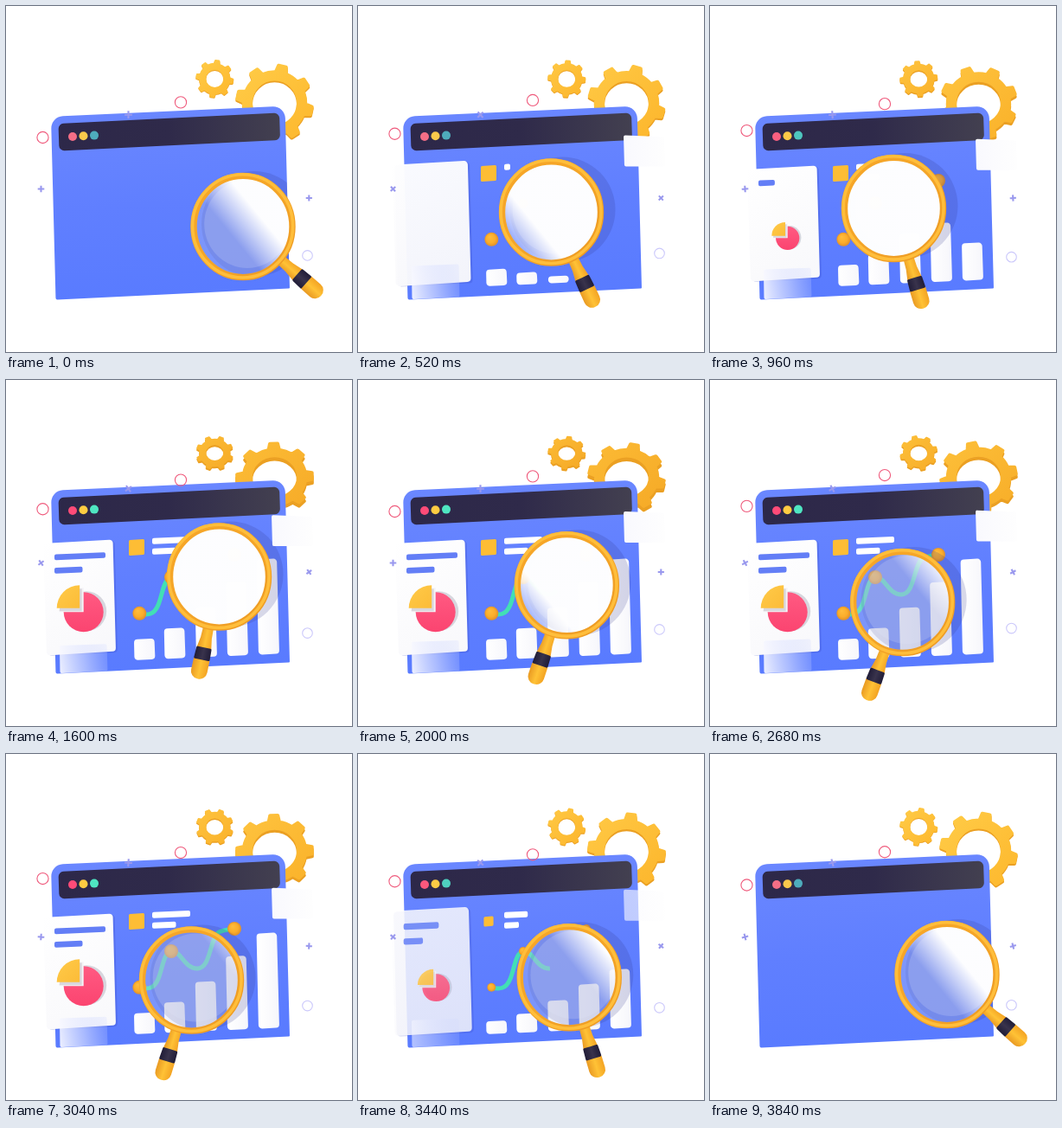
Write an HTML page with a canvas that moves like this. It is 400 by 400 pixels and loops after 4 s.

```html
<!DOCTYPE html>
<html lang="en">
<head>
<meta charset="utf-8">
<title>Dashboard search</title>
<style>
html, body { margin: 0; width: 100%; height: 100%; overflow: hidden; background: #fff; }
canvas { display: block; width: 400px; height: 400px; }
</style>
</head>
<body>
<canvas id="stage" width="400" height="400"></canvas>
<script>
const ctx = document.getElementById('stage').getContext('2d');
const TAU = Math.PI * 2;
const RAD = Math.PI / 180;
const LOOP = 4000, STEP = 40, LAST = 3840;
const LEAVE = 3230;

// time, lens x, lens y, handle angle, edge of the glare
const POSES = [
  [0, 274, 255, 41.5, 3],
  [520, 223.5, 238.5, 65, -44],
  [960, 212.5, 234, 73.5, -95],
  [1600, 246.5, 227.5, 102, -95],
  [2360, 233, 249.5, 111, 10],
  [3040, 214.5, 261.5, 107, 62],
  [LAST, 274, 255, 41.5, 3]
];
const PANEL = [[52, 128, 14], [322.5, 115.5, 14], [328, 326.5, 1], [57.5, 339.5, 2]];
const BARS = [[148.5, 24], [183.5, 35], [220, 57], [256, 85], [292, 110]];
const CURVE = new Path2D(
  'M154 270C164 272 171 272 176 260S182 230 191 228' +
  'C203 228 206 248 221 248C237 248 235 214 246 206Q249 204 264 202');

const clamp = v => Math.max(0, Math.min(1, v));
const ease = v => { v = clamp(v); return v * v * (3 - 2 * v); };
const mix = (a, b, k) => `rgb(${a.map((v, i) => Math.round(v + (b[i] - v) * k))})`;

// Grows from start over span, then withdraws before the loop ends.
const show = (t, start, span) =>
  ease((t - start) / span) * (1 - ease((t - LEAVE) / 500));

// Monotone cubic through one column of the pose table.
function track(col, t) {
  const n = POSES.length - 1;
  let i = 0;
  while (i < n - 1 && t > POSES[i + 1][0]) i++;
  const rate = j => (POSES[j + 1][col] - POSES[j][col]) / (POSES[j + 1][0] - POSES[j][0]);
  const slope = j => {
    if (j === 0 || j === n) return 0;
    const a = rate(j - 1), b = rate(j);
    return a * b > 0 ? 2 * a * b / (a + b) : 0;
  };
  const p = POSES[i], q = POSES[i + 1], d = q[0] - p[0], u = (t - p[0]) / d;
  return p[col] + (q[col] - p[col]) * ease(u) +
    d * (u * (1 - u) * (1 - u) * slope(i) - u * u * (1 - u) * slope(i + 1));
}

function linear(x0, y0, x1, y1, ...stops) {
  const g = ctx.createLinearGradient(x0, y0, x1, y1);
  stops.forEach((c, i) => g.addColorStop(i / (stops.length - 1), c));
  return g;
}

function disc(x, y, r, fill) {
  ctx.beginPath();
  ctx.arc(x, y, Math.max(0, r), 0, TAU);
  ctx.fillStyle = fill;
  ctx.fill();
}

// Polygon with rounded corners; each point may carry its own radius.
function polyPath(pts, r) {
  const n = pts.length, [a, b] = [pts[n - 1], pts[0]];
  ctx.beginPath();
  ctx.moveTo((a[0] + b[0]) / 2, (a[1] + b[1]) / 2);
  pts.forEach((p, i) => {
    const q = pts[(i + 1) % n];
    ctx.arcTo(p[0], p[1], (p[0] + q[0]) / 2, (p[1] + q[1]) / 2, p[2] ?? r);
  });
  ctx.closePath();
}

function poly(pts, r, fill) {
  polyPath(pts, r);
  ctx.fillStyle = fill;
  ctx.fill();
}

function stroke(color, width) {
  ctx.strokeStyle = color;
  ctx.lineWidth = width;
  ctx.stroke();
}

// Rounded bar of text that extends to the right, slightly rising.
function textLine(x, y, w, h, k, color) {
  if (k < 0.02) return;
  const len = Math.max(h, w * k), rise = len * 0.045;
  poly([[x, y - h / 2], [x + len, y - h / 2 - rise],
    [x + len, y + h / 2 - rise], [x, y + h / 2]], 2, color);
}

function gearPath(r, hole, turn) {
  const teeth = 8, pitch = TAU / teeth, root = r * 0.82;
  ctx.beginPath();
  for (let i = 0; i < teeth; i++) {
    const a = turn + i * pitch;
    [[-0.22, root], [-0.13, r], [0.13, r], [0.22, root]].forEach(([o, d]) =>
      ctx.lineTo(Math.cos(a + o * pitch) * d, Math.sin(a + o * pitch) * d));
    ctx.arc(0, 0, root, a + 0.22 * pitch, a + 0.78 * pitch);
  }
  ctx.closePath();
  ctx.moveTo(hole, 0);
  ctx.arc(0, 0, hole, 0, TAU, true);
}

function gear(x, y, r, hole, turn, tilt) {
  const depth = r * (0.04 + 0.5 * tilt), bevel = r * 0.09;
  const face = linear(-r, -r, r, r, mix([255, 204, 72], [252, 186, 52], tilt * 8),
    mix([253, 183, 44], [245, 168, 38], tilt * 8));
  ctx.save();
  ctx.lineJoin = 'round';
  [[depth, '#eba023'], [0, face]].forEach(([drop, fill]) => {
    ctx.save();
    ctx.translate(x, y + drop);
    ctx.scale(1, 1 - tilt);
    gearPath(r - bevel / 2, hole + bevel / 2, turn);
    ctx.fillStyle = fill;
    ctx.fill('evenodd');
    stroke(fill, bevel);
    ctx.restore();
  });
  ctx.restore();
}

function gears(t) {
  const p = ease(t / LOOP), tilt = 0.12 * Math.sin(p * Math.PI);
  gear(241.3, 84, 22, 10, (-82 - 90 * p) * RAD, tilt);
  gear(310.5, 112, 45.5, 25.5, (-78 + 90 * p) * RAD, tilt);
}

function panel(t) {
  const k = ease((t - 500) / 1000) * (1 - ease((t - LEAVE) / 500));
  poly(PANEL, 4, linear(180, 120, 195, 335, '#6a87ff', '#607fff', '#597bff'));
  poly([[60.5, 136], [316, 123.5], [317, 155], [61.5, 167.5]], 6,
    linear(60, 0, 317, 0, '#2d2849', '#2f2a4a', '#434050'));
  disc(77, 151, 5, mix([244, 110, 134], [255, 75, 120], k));
  disc(89.5, 150.2, 5, mix([250, 201, 75], [255, 204, 66], k));
  disc(102, 149.6, 5, mix([78, 172, 188], [79, 230, 194], k));
}

// The lens darkens everything that lies on the panel.
function lensShadow(x, y) {
  ctx.save();
  polyPath(PANEL, 4);
  ctx.clip();
  disc(x + 13, y - 3, 61, 'rgba(52,56,140,.19)');
  ctx.restore();
}

function ornaments(t) {
  const w = t / 2000 * TAU, bob = -Math.sin(w + 0.3) * 3.8;
  [[42.5, 148 + 4 * Math.cos(w), '#ef5a7c'], [202, 112.5 + bob, '#ef5a7c'],
    [348.5, 289.5 + bob, '#cbc8fb']].forEach(([x, y, color], i) => {
    ctx.beginPath();
    ctx.arc(x, y, i < 2 ? 6.6 : 5.8, 0, TAU);
    stroke(color, 1.1);
  });
  return bob;
}

function pluses(t) {
  [[141.5, 125.7, 4.4], [40.5, 211.5, 3.8], [350.3, 222, 3.6]].forEach(([x, y, r]) => {
    ctx.save();
    ctx.translate(x, y);
    ctx.rotate(t * 0.09 * RAD);
    ctx.beginPath();
    ctx.moveTo(-r, 0);
    ctx.lineTo(r, 0);
    ctx.moveTo(0, -r);
    ctx.lineTo(0, r);
    stroke('#9a99ee', 2.1);
    ctx.restore();
  });
}

function ball(x, y, k) {
  if (k < 0.02) return;
  const r = 8 * k, g = ctx.createRadialGradient(x - r * 0.3, y - r * 0.4, 0, x, y, r);
  g.addColorStop(0, '#ffbd3c');
  g.addColorStop(0.65, '#fbad2b');
  g.addColorStop(1, '#e0902a');
  disc(x, y, r, g);
}

function chart(t) {
  BARS.forEach(([x, full], i) => {
    const k = show(t, 150 + 147 * i, 520);
    if (k < 0.02) return;
    const h = Math.max(8, full * k), y = 324 - 1.6 * i, lean = h * 0.022;
    poly([[x - lean, y - h], [x + 23.5 - lean, y - h - 1.2], [x + 24, y - 1.2], [x, y]],
      Math.min(4, h / 2), linear(x, 0, x + 24, 0, '#ffffff', '#f6f6fb'));
  });

  const square = 9 * show(t, 150, 300);
  poly([[151 - square, 194 - square], [151 + square, 193 - square],
    [151 + square, 193 + square], [151 - square, 194 + square]], 1.5, '#fdbd35');
  textLine(169, 186.3, 44, 7, show(t, 430, 450), '#fff');
  textLine(169, 198.3, 27.5, 7, show(t, 560, 450), '#fff');

  const drawn = clamp((t - 1100) / 1500) * (1 - ease((t - LEAVE) / 450));
  if (drawn > 0) {
    ctx.save();
    ctx.setLineDash([185 * drawn, 999]);
    ctx.strokeStyle = '#42dfb5';
    ctx.lineWidth = 5;
    ctx.stroke(CURVE);
    ctx.restore();
  }
  ball(154.3, 269.8, show(t, 180, 300));
  ball(191, 228, show(t, 330, 300));
  ball(264, 202, show(t, 560, 300));
}

function pie(k) {
  if (k < 0.02) return;
  ctx.save();
  ctx.translate(89.7, 268.3);
  ctx.scale(k, k);
  disc(3.5, -1, 23, 'rgba(120,120,140,.28)');
  disc(0, 0, 23, linear(0, -23, 0, 23, '#ff5a82', '#fb4470'));
  const wedge = (x, y, r, fill) => {
    ctx.beginPath();
    ctx.moveTo(x, y);
    ctx.arc(x, y, r, Math.PI, Math.PI * 1.5);
    ctx.closePath();
    ctx.fillStyle = fill;
    ctx.fill();
  };
  wedge(0, 0, 28, '#f4f3f7');
  wedge(-2, -1, 26, '#d9d6dc');
  wedge(-4.5, -4.5, 26.5, linear(-30, -30, 0, 0, '#ffca48', '#fbb935'));
  ctx.restore();
}

function card(t) {
  const k = show(t, 150, 570);
  if (k < 0.02) return;
  const zoom = 1 + 0.3 * (1 - k);
  ctx.save();
  ctx.globalAlpha = clamp(k * 1.35);
  ctx.translate(85, 251.5);
  ctx.scale(zoom, zoom);
  ctx.translate(-85, -251.5);
  poly([[45.5, 189.5], [125.5, 185.5], [129, 315], [49, 319]], 4, 'rgba(50,66,190,.25)');
  poly([[43, 189], [123.5, 184.5], [127, 313.5], [47, 318.5]], 4,
    linear(43, 185, 127, 318, '#ffffff', '#f8f8fb'));
  textLine(56, 205, 59, 6.6, show(t, 790, 450), '#637ef6');
  textLine(56, 220.5, 32.5, 6.6, show(t, 980, 400), '#637ef6');
  pie(show(t, 690, 480));
  ctx.restore();
}

function glass(t, bob) {
  const k = show(t, 180, 300);
  if (k < 0.02) return;
  ctx.save();
  ctx.globalAlpha = k;
  const y = 304 + bob;
  poly([[62, y], [116.5, y - 2], [117.5, 336.5], [62.5, 339]], 2,
    linear(62, 330, 118, 320, 'rgba(250,250,255,.9)', 'rgba(225,230,255,.6)', 'rgba(200,210,255,.22)'));
  const top = 154 + bob;
  poly([[307, top - 1], [354, top + 1], [355, top + 35], [308, top + 35]], 2,
    linear(307, 0, 355, 0, '#f9f9fe', '#fefefe'));
  ctx.restore();
}

function handle(angle) {
  ctx.save();
  ctx.rotate(angle * RAD);
  const tint = w => linear(0, -w, 0, w, '#f3a323', '#ffc236', '#e99a23');
  poly([[58, -6], [72, -6.5], [85, -8.6], [85, 8.6], [72, 6.5], [58, 6]], 1, tint(8));
  poly([[97, -9.4], [120.5, -9.5, 9], [120.5, 9.5, 9], [97, 9.4]], 1, tint(9.5));
  poly([[83.5, -8.8], [98, -9.4], [98, 9.4], [83.5, 8.8]], 1.5,
    linear(0, -9, 0, 9, '#211d38', '#39334c', '#211d38'));
  ctx.restore();
}

function magnifier(x, y, angle, edge) {
  ctx.save();
  ctx.translate(x, y);
  handle(angle);

  ctx.save();
  ctx.scale(57 / 58.5, 1);
  disc(0, 0, 58, 'rgba(205,210,240,.28)');
  disc(5, -3, 51, 'rgba(225,230,250,.2)');
  const dx = Math.cos(-40 * RAD), dy = Math.sin(-40 * RAD), soft = 20;
  disc(0, 0, 58, linear(dx * (edge - soft), dy * (edge - soft),
    dx * (edge + soft), dy * (edge + soft),
    'rgba(255,255,255,0)', 'rgba(255,255,255,.5)', 'rgba(255,255,255,.98)'));
  ctx.restore();

  ctx.beginPath();
  ctx.ellipse(0, 0, 57, 58.6, 0, 0, TAU);
  stroke(linear(-45, -45, 45, 45, '#f6a628', '#f4a528', '#ee9c24'), 7.4);
  ctx.beginPath();
  ctx.ellipse(-0.4, -0.6, 58, 59.6, 0, 0, TAU);
  stroke('#ffbe3b', 3.6);
  ctx.restore();
}

function draw(t) {
  const [x, y, angle, edge] = [1, 2, 3, 4].map(c => track(c, t));
  ctx.fillStyle = '#fff';
  ctx.fillRect(0, 0, 400, 400);
  gears(t);
  panel(t);
  const bob = ornaments(t);
  chart(t);
  lensShadow(x, y);
  card(t);
  glass(t, bob);
  pluses(t);
  magnifier(x, y, angle, edge);
}

const begin = performance.now();
function tick() {
  const now = (performance.now() - begin) % LOOP;
  const t = Math.min(LAST, Math.floor(now / STEP) * STEP);
  draw(t < 80 ? 0 : t);
  requestAnimationFrame(tick);
}
tick();
</script>
</body>
</html>
```
